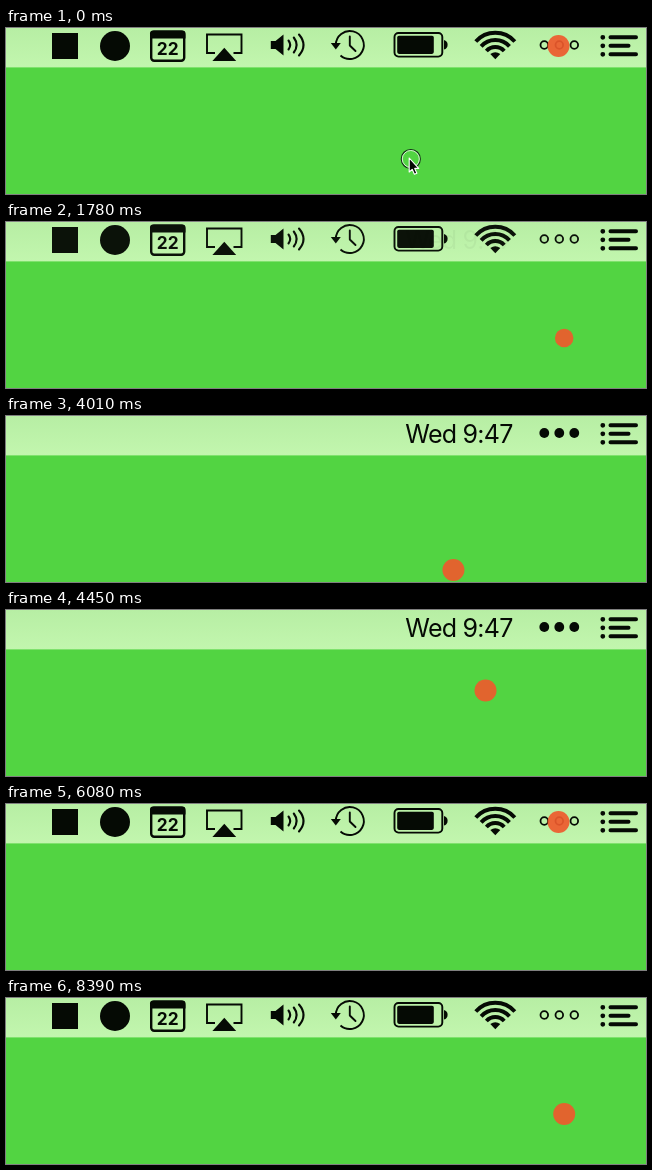
These frames come from a looping animation (640 by 166 pixels, 8.49 s). An HTML page:

```html
<!DOCTYPE html>
<html lang="en">
<head>
<meta charset="utf-8">
<title>Menu bar</title>
<style>
  html, body { margin: 0; width: 100%; height: 100%; overflow: hidden; background: #52d442; }
  svg { display: block; width: 640px; height: 166px; }
  .line { fill: none; stroke: #050a04; }
  .round { stroke-linecap: round; stroke-linejoin: round; }
  text { font-family: Inter, "Liberation Sans", sans-serif; fill: #050a04; }
</style>
</head>
<body>
<svg viewBox="0 0 640 166" fill="#050a04">
  <defs>
    <linearGradient id="barFill" x2="0" y2="1">
      <stop stop-color="#b7eea4"/>
      <stop offset="1" stop-color="#c2f6ae"/>
    </linearGradient>
  </defs>
  <rect width="640" height="166" fill="#52d442"/>
  <rect width="640" height="39.4" fill="url(#barFill)"/>

  <g id="icons">
    <rect x="46" y="5" width="26" height="26"/>
    <circle cx="109" cy="18" r="15"/>

    <!-- calendar -->
    <rect class="line" x="145.2" y="3.800" width="33" height="29" rx="3" stroke-width="2.400"/>
    <path d="M144 10.500V5.600a3 3 0 0 1 3-3h29.500a3 3 0 0 1 3 3v4.900z"/>
    <text x="161.700" y="26.500" font-size="17.300" font-weight="700" text-anchor="middle">22</text>

    <!-- screen mirroring -->
    <path class="line" d="M209 25H201V6.500H235.500V25H227.500" stroke-width="1.900"/>
    <path d="M218.300 19.800L230.200 33H206.400z"/>

    <!-- volume -->
    <path d="M264.800 13h4.700l8-6.500v21l-8-6.500h-4.700z"/>
    <path class="line round" d="M282.500 12.500q3.400 4.500 0 9M287.800 9.500q5.600 7.500 0 15M293 6.500q9 10.500 0 21" stroke-width="2.100"/>

    <!-- history clock -->
    <path class="line" d="M329.800 17A14 14 0 1 1 334.500 27.500" stroke-width="1.900"/>
    <path d="M324.800 15h10l-5 6.500z"/>
    <path class="line round" d="M343.800 8.500V17.500L349.500 23" stroke-width="1.900"/>

    <!-- battery -->
    <rect class="line" x="388.500" y="5" width="47.800" height="23.600" rx="4" stroke-width="1.900"/>
    <rect x="391.200" y="7.700" width="36.600" height="18.200" rx="1.800"/>
    <path d="M438 12q3.600 1 3.600 4.800t-3.600 4.800z"/>

    <!-- wireless -->
    <g id="waves" class="line" stroke-width="3.900"></g>
    <path d="M489.300 31.200L484.300 26Q489.300 22.500 494.300 26z"/>

    <g id="rings" class="line" stroke-width="1.800"></g>
  </g>

  <g id="clock" opacity="0">
    <text x="399.300" y="27" font-size="25" letter-spacing="-0.750">Wed 9:47</text>
    <g id="beads"></g>
  </g>

  <!-- list -->
  <path class="line round" d="M604.500 9.300H630M604.500 17.800H622.500M604.500 26.300H630" stroke-width="4"/>
  <path class="line round" d="M596.800 9.300h.01M596.800 17.800h.01M596.800 26.300h.01" stroke-width="4.800"/>

  <g id="pointer">
    <g id="halo" fill="none">
      <circle cx="404.800" cy="131" r="9.500" stroke="#16301a" stroke-width="1.200"/>
      <circle cx="404.800" cy="131" r="8.500" stroke="#d5f5cf" stroke-width="1"/>
    </g>
    <path d="M403.200 130V144L406.200 141.300L408.400 146.300L410.900 145.200L408.700 140.400H412.700z"
          stroke="#fff" stroke-width="1.100" stroke-linejoin="round"/>
  </g>

  <circle id="dot" fill="#ee5a2d" fill-opacity=".92"/>
</svg>
<script>
  const LOOP = 8490, STEP = 148.3, LAST = 8390;
  const el = id => document.getElementById(id);
  const clamp = v => Math.min(1, Math.max(0, v));
  const span = (t, from, to) => clamp((t - from) / (to - from));
  const ease = p => p < .5 ? 4 * p ** 3 : 1 - 4 * (1 - p) ** 3;

  const item = [552.5, 18], desk = [558.2, 116], rest = [447.3, 154.5];
  // start, end, from, bend, to
  const moves = [
    [250, 1350, item, [573, 62], desk],
    [1880, 2350, desk, [510, 142], rest],
    [3900, 5040, rest, [470, 60], item],
    [6820, 7990, item, [573, 62], desk]
  ];
  const presses = [1750, 5300, 8150];

  const circles = r => [538.3, 553.3, 568.3]
    .map(x => `<circle cx="${x}" cy="17" r="${r}"/>`).join("");
  el("rings").innerHTML = circles(3.8);
  el("beads").innerHTML = circles(4.9);
  el("waves").innerHTML = [12, 19, 26.2].map(r => {
    const dx = r * .745, y = 31 - r * .667;
    return `<path d="M${489.3 - dx} ${y}A${r} ${r} 0 0 1 ${489.3 + dx} ${y}"/>`;
  }).join("");

  // Time advances in even steps, with one short closing step.
  const hold = t => t >= LAST ? LAST : Math.floor((t + 10) / STEP) * STEP;

  function place(t) {
    const [start, end, a, b, c] = moves.filter(m => m[0] <= t).pop() || moves[0];
    const p = ease(span(t, start, end)), q = 1 - p;
    return [0, 1].map(i => q * q * a[i] + 2 * p * q * b[i] + p * p * c[i]);
  }

  function draw(now) {
    const t = hold(now % LOOP);
    const [x, y] = place(t);
    const press = Math.max(...presses.map(c => clamp(1 - Math.abs(t - c) / 220)));
    const dot = el("dot");
    dot.setAttribute("cx", x);
    dot.setAttribute("cy", y);
    dot.setAttribute("r", 11 - 2 * press);

    const folded = span(t, 1765, 2200) - span(t, 5550, 6060);
    el("icons").setAttribute("opacity", 1 - folded);
    el("clock").setAttribute("opacity", folded);
    el("halo").style.display = t < 140 ? "" : "none";
    el("pointer").style.display = t < 1330 ? "" : "none";
  }

  const began = performance.now();
  function tick() {
    draw(performance.now() - began);
    requestAnimationFrame(tick);
  }
  tick();
</script>
</body>
</html>
```
